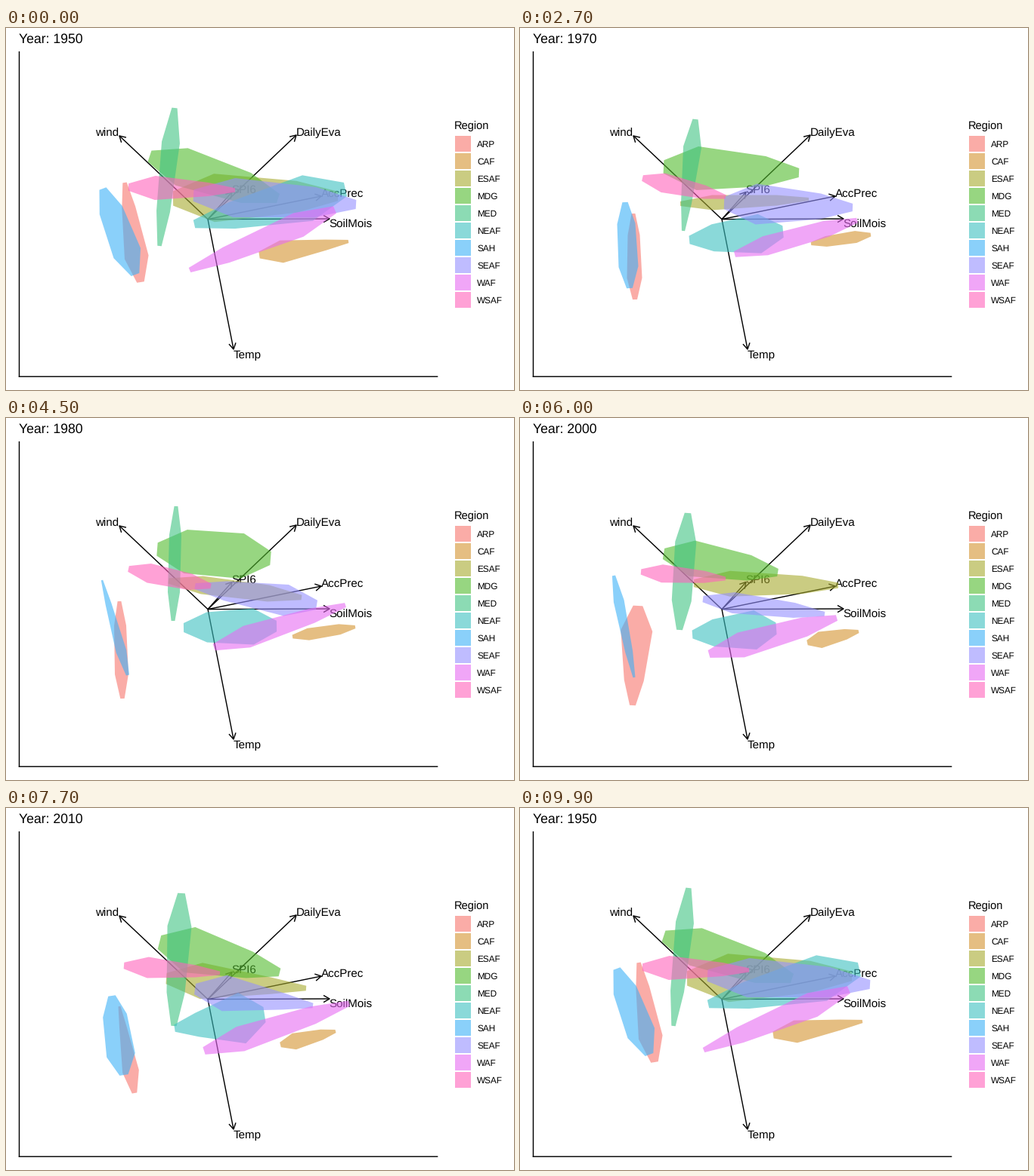
Animation, 672 px wide and 480 px high, one loop 10 s. Source, as a matplotlib script:

```python
import numpy as np
import matplotlib.pyplot as plt
from matplotlib.animation import FuncAnimation
from matplotlib.patches import Polygon, Rectangle

W, H, DPI = 672, 480, 96
FRAMES, INTERVAL = 100, 100
ALPHA = 0.6
ORIGIN = 267, 253.6

YEARS = [1950, 1960, 1970, 1980, 1990, 2000, 2010, 2020, 1950]
# first and last frame of each move between neighbouring years
MOVES = [(4, 15), (17, 27), (30, 41), (43, 53),
         (55, 65), (68, 77), (80, 89), (92, 99)]

plt.rcParams.update({"font.family": "Liberation Sans", "text.hinting": "none"})

fig = plt.figure(figsize=(W / DPI, H / DPI), dpi=DPI, facecolor="white")
ax = fig.add_axes([0, 0, 1, 1])
ax.set_xlim(0, W)
ax.set_ylim(H, 0)
ax.axis("off")

regions = []


def blade(pose):
    """Outline around a spine, from its two ends and two half widths."""
    tail, head, (w1, w2) = np.reshape(pose, (3, 2))
    spine = head - tail
    normal = np.array([spine[1], -spine[0]]) / np.hypot(*spine)
    along = np.array([0, 0.25, 0.75, 1])[:, None]
    width = np.array([0.3 * w1, w1, w2, 0.3 * w2])[:, None]
    middle = tail + along * spine
    return np.vstack([middle + width * normal,
                      (middle - width * normal)[::-1]])


def region(name, color, *poses):
    """Poses for 1950, 1960, 1970, just after 1980, 1995 and 2010."""
    s50, s60, s70, after80, s95, s10 = np.array(poses, float)
    drift = (s10 - after80) / 6
    s90, s00 = s95 - drift, s95 + drift
    s80 = after80 + (after80 - s90) / 4
    s20 = (s70 + s10) / 2
    states = [s50, s60, s70, s80, s90, s00, s10, s20, s50]
    patch = Polygon(blade(s50), closed=True, fc=color, alpha=ALPHA, lw=0,
                    zorder=3)
    ax.add_patch(patch)
    regions.append((name, color, states, patch))


def stroke(xs, ys):
    ax.plot(xs, ys, color="black", lw=1.42 * 72 / DPI, zorder=1, snap=False,
            solid_capstyle="butt", solid_joinstyle="round")


def label(x, y, text, size, ha="left"):
    return ax.text(x, y, text, fontsize=size, ha=ha, va="baseline", zorder=2)


def arrow(name, x, y, head=9.2):
    x0, y0 = ORIGIN
    stroke([x0, x], [y0, y])
    back = np.arctan2(y0 - y, x0 - x)
    barbs = back + np.array([-1, 0, 1]) * np.pi / 6
    reach = np.array([head, 0, head])
    stroke(x + reach * np.cos(barbs), y + reach * np.sin(barbs))
    # upper labels sit beside the tip, lower ones hang below it
    drop = 1 if y < 250 else 11.8
    label(x - 0.5, y + drop, name, 4 * 72 / 25.4, "right" if x < x0 else "left")


region("ARP", "#F8766D",
       (157, 205, 178, 337, 9, 16), (156, 250, 168, 354, 7, 12),
       (150, 246, 152, 360, 8, 10), (150, 243, 154, 372, 8, 9),
       (156, 249, 149, 381, 21, 13), (150, 263, 170, 378, 5, 11))
region("CAF", "#D4932F",
       (335, 301, 453, 283, 15, 7), (368, 296, 476, 270, 9, 9),
       (385, 286, 464, 274, 7, 8), (379, 290, 462, 277, 8, 7),
       (380, 298, 448, 283, 11, 7), (363, 314, 436, 296, 11, 7))
region("ESAF", "#A7AA2F",
       (221, 226, 439, 223, 32, 21), (216, 228, 381, 232, 25, 11),
       (212, 233, 382, 227, 10, 7), (215, 216, 391, 238, 12, 11),
       (230, 219, 421, 222, 17, 12), (212, 226, 397, 239, 24, 11))
region("MDG", "#52BB2D",
       (190, 170, 360, 226, 26, 21), (194, 178, 338, 213, 25, 20),
       (190, 184, 369, 192, 29, 20), (200, 174, 350, 186, 29, 30),
       (190, 180, 341, 205, 24, 17), (203, 178, 362, 218, 31, 18))
region("MED", "#3FC382",
       (223, 106, 203, 289, 12, 9), (231, 121, 218, 263, 12, 6),
       (232, 121, 216, 269, 12, 7), (225, 117, 221, 269, 8, 8),
       (222, 126, 211, 281, 14, 13), (232, 113, 222, 289, 16, 12))
region("NEAF", "#3CC1C1",
       (249, 260, 449, 214, 18, 31), (238, 268, 373, 258, 17, 25),
       (224, 281, 348, 270, 18, 26), (235, 278, 358, 276, 20, 24),
       (228, 287, 339, 279, 18, 26), (223, 292, 342, 274, 16, 34))
region("SAH", "#3CB1F7",
       (128, 213, 171, 327, 16, 19), (127, 219, 143, 350, 8, 11),
       (139, 231, 145, 345, 12, 13), (127, 215, 161, 341, 4, 7),
       (124, 209, 151, 344, 7, 5), (140, 249, 156, 354, 16, 19))
region("SEAF", "#9590FF",
       (248, 222, 463, 234, 26, 20), (277, 213, 456, 236, 23, 16),
       (270, 232, 440, 238, 27, 17), (250, 223, 411, 248, 13, 21),
       (242, 240, 403, 260, 14, 10), (250, 240, 406, 262, 24, 11))
region("WAF", "#E76BF3",
       (243, 321, 435, 241, 11, 17), (250, 315, 432, 263, 16, 11),
       (284, 300, 446, 255, 13, 11), (275, 304, 449, 248, 15, 10),
       (250, 313, 419, 265, 17, 13), (262, 322, 454, 259, 17, 12))
region("WSAF", "#FF62BC",
       (162, 211, 303, 215, 16, 9), (165, 206, 281, 215, 13, 7),
       (162, 199, 272, 224, 13, 9), (162, 200, 271, 223, 13, 11),
       (160, 204, 272, 213, 12, 8), (156, 209, 283, 219, 14, 8))

# axes
stroke([17.5, 17.5], [31, 463])
stroke([16.8, 571.3], [462.2, 462.2])

arrow("wind", 150, 143)
arrow("DailyEva", 384, 142)
arrow("SPI6", 299, 217.5)
arrow("AccPrec", 417, 223)
arrow("SoilMois", 428, 253)
arrow("Temp", 301, 426)

# legend
label(592.8, 134, "Region", 11)
for row, (name, color, _, _) in enumerate(regions):
    top = 143 + 23.04 * row
    ax.add_patch(Rectangle((594, top), 21, 21, fc=color, alpha=ALPHA, lw=0))
    label(623.2, top + 15, name, 8.8)

title = label(17.4, 20, "", 13.2)


def phase(frame):
    """Index of the current move and how far it has got, from 0 to 1."""
    for i, (a, b) in enumerate(MOVES):
        if frame <= b:
            return i, max(0, (frame - a) / (b - a))


def draw(frame):
    i, t = phase(frame)
    title.set_text(f"Year: {YEARS[i + (t >= 0.5)]}")
    for _, _, states, patch in regions:
        patch.set_xy(blade((1 - t) * states[i] + t * states[i + 1]))
    return [title] + [r[3] for r in regions]


anim = FuncAnimation(fig, draw, frames=FRAMES, interval=INTERVAL,
                     repeat=True, repeat_delay=0)
plt.show()
```
